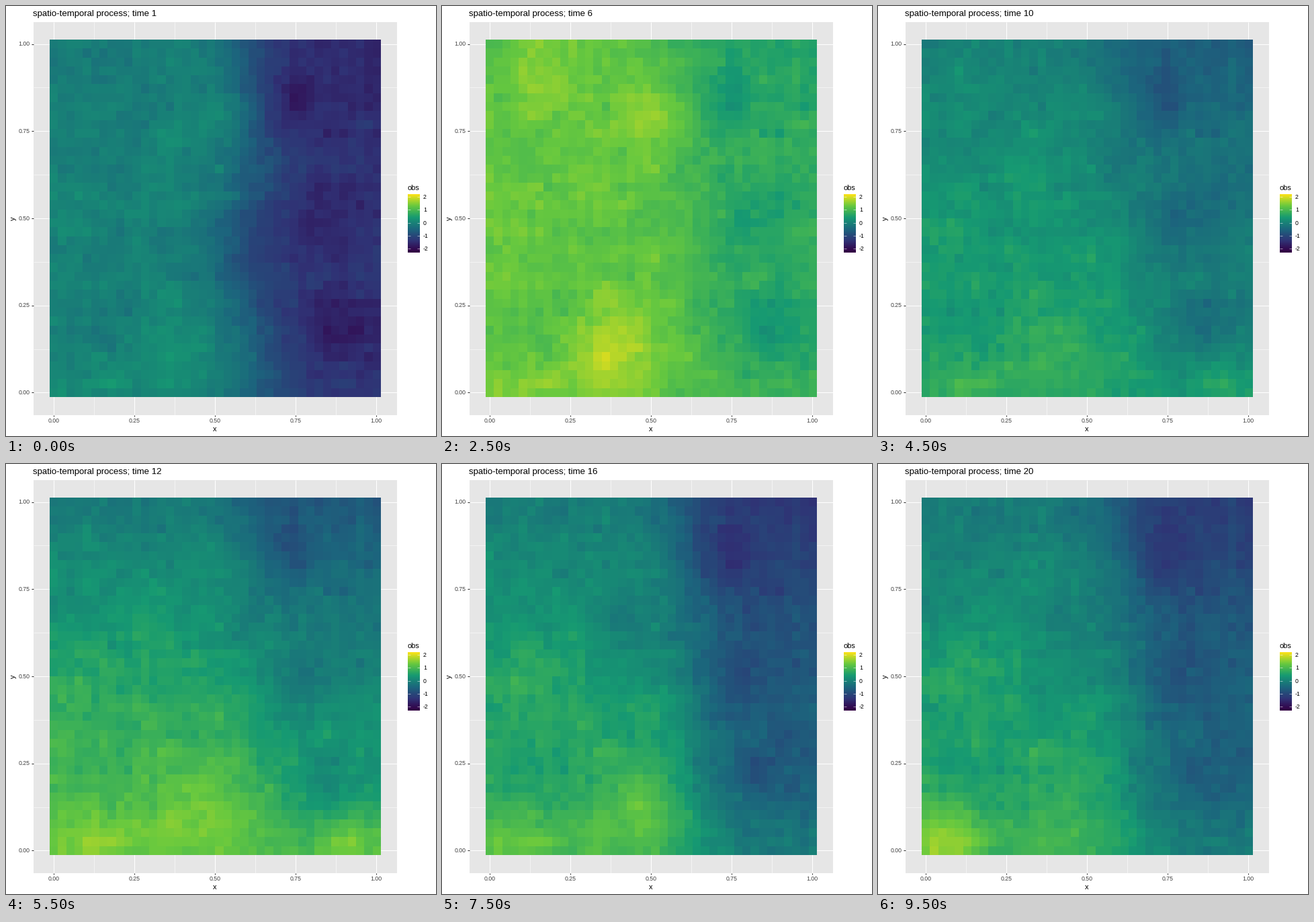
A matplotlib script for the animation above (10000 ms loop, 640 by 640 pixels).

```python
import numpy as np
import matplotlib.pyplot as plt
from matplotlib.animation import FuncAnimation
from matplotlib.colors import LinearSegmentedColormap, ListedColormap

plt.rcParams["font.family"] = "Liberation Sans"

CELLS, STEPS = 40, 20
GAMMA = 1.22

# Spots that last through the loop: x, y, strength.
LASTING = [(.11, .20, -.07), (.88, .18, -.10), (.80, .47, -.07), (.73, .85, -.07)]
# Spots that swell and fade: x, y, strength, time of the peak.
PASSING = [
    (.58, .40, -.12, 1), (.52, .78, .12, 4), (.37, .11, .13, 5), (.20, .91, .07, 6),
    (.92, .02, .11, 12), (.49, .12, .09, 15), (.42, .67, -.09, 17),
    (.14, .52, .08, 18), (.04, .03, .13, 20),
]


def bell(distance, width):
    return np.exp(-(distance / width) ** 2)


def ease(t, start, end):
    u = np.clip((t - start) / (end - start), 0, 1)
    return u * u * (3 - 2 * u)


def smooth_field(x, y, t):
    level = .51 + .32 * bell(t - 5, 1.8) - .12 * bell(t - 1, 1.5) + .09 * bell(t - 12, 2)
    drop = .12 + .20 * bell(t - 1, 2) + .15 * ease(t, 12, 16) - .05 * ease(t, 16, 20)
    south = .05 + .20 * ease(t, 8, 12) + .10 * bell(t - 12, 2)
    west = 1 / (1 + np.exp((x - .63) / .07))
    field = level + drop * (west - .62) + south * (.5 - y)
    for cx, cy, strength in LASTING:
        field = field + strength * bell(np.hypot(x - cx, y - cy), .11)
    for cx, cy, strength, peak in PASSING:
        field = field + strength * bell(np.hypot(x - cx, y - cy), .11) * bell(t - peak, 3.5)
    return field


def make_fields():
    x, y = np.meshgrid(np.linspace(0, 1, CELLS), np.linspace(1, 0, CELLS))
    rng = np.random.default_rng(11)
    lag = np.abs(np.subtract.outer(np.arange(CELLS), np.arange(CELLS)))
    root = np.linalg.cholesky(np.exp(-lag / 2))

    def texture():
        return root @ rng.standard_normal((CELLS, CELLS)) @ root.T

    # Rough texture, part fixed and part slowly renewed.
    steady = .012 * texture() + .012 * rng.standard_normal((CELLS, CELLS))
    drift = texture()
    fields = []
    for t in range(1, STEPS + 1):
        fields.append(smooth_field(x, y, t) + steady + .014 * drift)
        drift = .8 * drift + .6 * texture()
    return fields


def make_colormap():
    stops = plt.get_cmap("viridis")(np.linspace(0, 1, 6))
    ramp = LinearSegmentedColormap.from_list("ramp", stops)(np.linspace(0, 1, 256))
    return ListedColormap(ramp[:, :3] ** GAMMA)


FIELDS = make_fields()
COLORS = make_colormap()

fig = plt.figure(figsize=(640 / 72, 640 / 72), dpi=72, facecolor="white")
ax = fig.add_axes([0, 0, 1, 1])
ax.axis("off")


def line(xs, ys, color, width, z):
    ax.plot(xs, ys, color=color, lw=width, zorder=z, solid_capstyle="butt")


def label(x, y, text, size, color="black", **kw):
    return ax.text(x, y, text, fontsize=size, color=color, **kw)


def px(value):
    return 71 + 480 * value


def py(value):
    return 575.4 - 518.8 * value


ax.add_patch(plt.Rectangle((40.5, 23.5), 541.5, 585, color="#E6E6E6", lw=0, zorder=0))
for i in range(9):
    value, major = i / 8, i % 2 == 0
    width = 1.07 if major else 0.53
    line([px(value)] * 2, [23.5, 608.5], "white", width, 1)
    line([40.5, 582], [py(value)] * 2, "white", width, 1)
    if major:
        line([px(value)] * 2, [608.5, 611.3], "#333333", 1.07, 1)
        line([37.7, 40.5], [py(value)] * 2, "#333333", 1.07, 1)
        label(px(value), 620, f"{value:.2f}", 8.8, "#444444", ha="center")
        label(35.4, py(value) + 2.8, f"{value:.2f}", 8.8, "#444444", ha="right")

label(311, 633.4, "x", 11, ha="center")
label(11, 316.4, "y", 11, ha="center", va="center", rotation=90)
title = label(40.5, 15, "", 13.2)

image = ax.imshow(FIELDS[0], cmap=COLORS, vmin=0, vmax=1, aspect="auto",
                  interpolation="nearest", extent=(65, 557.6, 582, 50), zorder=2)

label(598, 274, "obs", 11)
ax.imshow(np.linspace(1, 0, 256)[:, None], cmap=COLORS, aspect="auto",
          extent=(598.3, 615.7, 366.8, 280.4), zorder=2)
for value in range(-2, 3):
    y = 322.5 - 19.3 * value
    line([598.3, 601.8], [y, y], "white", 0.5, 3)
    line([612.2, 615.7], [y, y], "white", 0.5, 3)
    label(621, y + 3.2, str(value), 8.8)

ax.set_xlim(0, 640)
ax.set_ylim(640, 0)


def update(step):
    image.set_data(FIELDS[step])
    title.set_text(f"spatio-temporal process; time {step + 1}")
    return image, title


animation = FuncAnimation(fig, update, frames=STEPS, interval=500,
                          repeat=True, repeat_delay=0)
plt.show()
```
